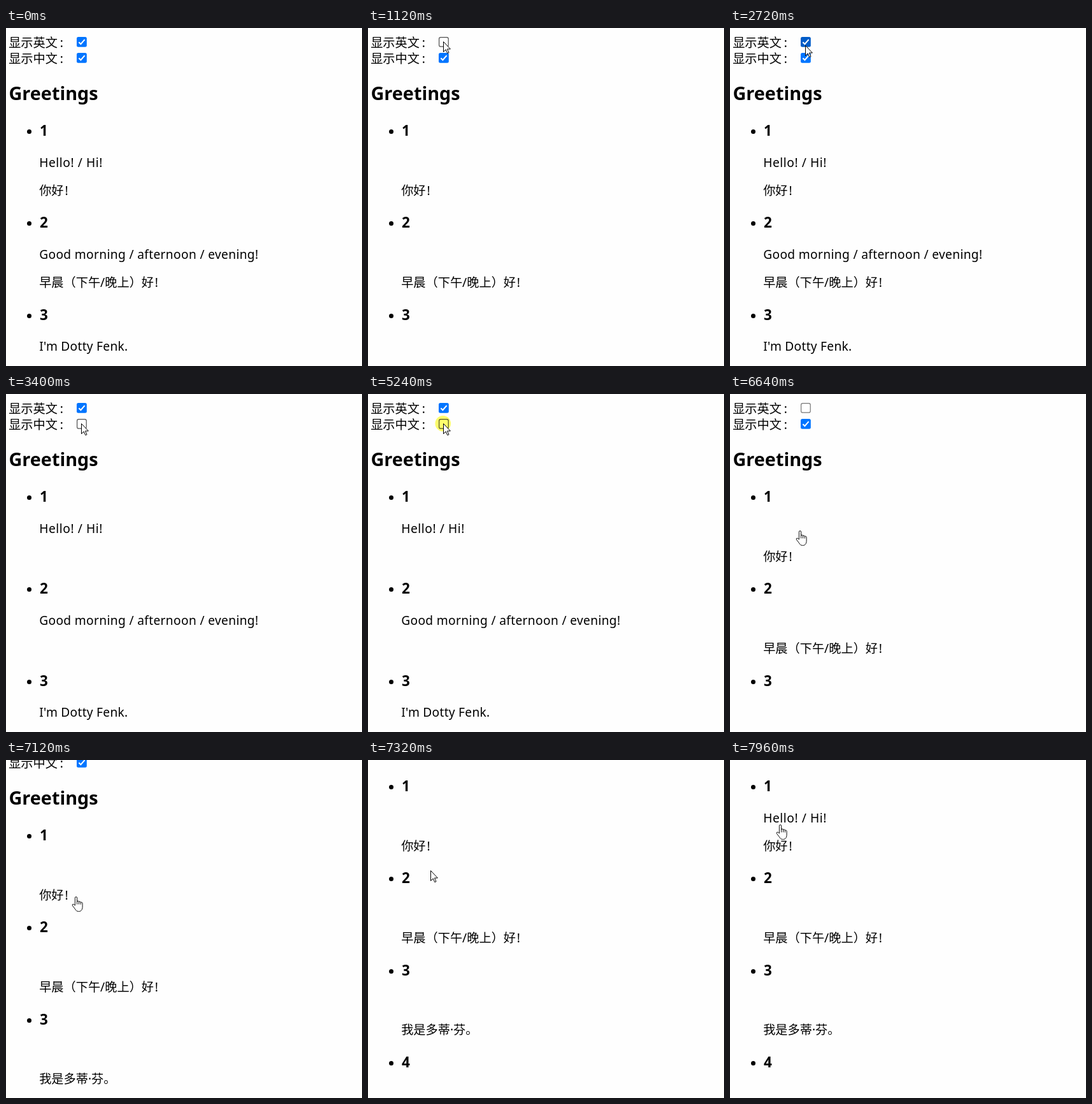
Animation of 559x530 px, one loop 8000 ms. Source, as an HTML page:

```html
<!DOCTYPE html>
<html lang="zh">
<head>
<meta charset="utf-8">
<title>Greetings</title>
<style>
html, body { margin: 0; width: 100%; height: 100%; overflow: hidden; background: #fefefe; }
svg { display: block; width: 559px; height: 530px; }
text { font: 19.2px "Noto Sans", "Noto Sans CJK SC", "Noto Sans CJK", sans-serif; fill: #000; }
.cn { font-weight: 350; }
.h2 { font-size: 28.8px; font-weight: 700; }
.h3 { font-size: 22.46px; font-weight: 700; }
</style>
</head>
<body>
<svg viewBox="0 0 559 530">
  <g id="page"></g>
  <circle id="glow" r="12.3" fill="#ffff6c" style="mix-blend-mode:multiply"/>
  <g id="pointer" stroke="#000" fill="#fff" stroke-linejoin="round">
    <path id="arrow" d="M.5.5V16.4L4.2 12.9L6.8 18.6L9 17.6L6.5 12H11.4Z"/>
    <g id="hand" transform="translate(-5.4 0)" stroke-width=".95">
      <path d="M4.8 14V2.2A1.6 1.6 0 0 1 8 2.2V8.6Q8 7 9.4 7T10.9 8.8Q11 7.6 12.3 7.8T13.7 9.8Q13.8 8.8 15.1 9T16.5 11V16C16.5 20.5 14.5 23.4 11 23.4H10C7.5 23.4 6 21.8 5 19.8L1.1 14.8Q0 12.7 1.2 12.2Q2.8 11.6 4.8 14Z"/>
      <path fill="none" d="M8 8.6V12.4M10.9 8.8V12.4M13.7 9.8V12.6"/>
    </g>
  </g>
</svg>
<script>
const LOOP = 8000, TICK = 40, PITCH = 144.3;
const $ = id => document.getElementById(id);
const page = $("page");
const within = (v, a, b) => v >= a && v < b;
const easeOut = (k, power = 2) => 1 - (1 - k) ** power;
const progress = (t, a, b) => Math.min(1, Math.max(0, (t - a) / (b - a)));
const show = (el, on) => { el.style.display = on ? "" : "none"; };

function set(el, attrs) {
  for (const k in attrs) el.setAttribute(k, attrs[k]);
  return el;
}

function add(tag, attrs, parent = page) {
  const el = document.createElementNS("http://www.w3.org/2000/svg", tag);
  return parent.appendChild(set(el, attrs));
}

// A closing mark can follow the string, set a little apart.
function write(x, y, str, attrs = {}, mark = "", gap = 0) {
  const el = add("text", { x, y, ...attrs });
  add("tspan", {}, el).textContent = str;
  if (mark) add("tspan", { dx: gap }, el).textContent = mark;
  return el;
}

function makeBox(y) {
  const rect = add("rect", { rx: 2.5, "stroke-width": 1.2 });
  const tick = add("path", {
    d: `M114.4 ${y + 8.2}L117.4 ${y + 11.2}L123.6 ${y + 4.2}`,
    fill: "none", stroke: "#fff", "stroke-width": 2
  });
  return (on, hover) => {
    const inset = on ? 0 : 0.6, size = 15.8 - 2 * inset;
    set(rect, {
      x: 111 + inset, y: y + inset, width: size, height: size,
      fill: on ? (hover ? "#005cc8" : "#0075ff") : "#fff",
      stroke: on ? "none" : (hover ? "#4f4f4f" : "#767676")
    });
    show(tick, on);
  };
}

const boxes = ["英", "中"].map((name, i) => {
  const y = 14 + 25 * i;
  write(4.2, y + 16, `显示${name}文`, { class: "cn" }, ":", 3.8);
  return { y, paint: makeBox(y) };
});
write(4.5, 113, "Greetings", { class: "h2" });

for (let i = 0; i < 4; i++) {
  const y = Math.round(169 + PITCH * i);
  add("circle", { cx: 36.5, cy: y - 6.5, r: 3.5 });
  write(53, y, String(i + 1), { class: "h3" });
}

const english = [
  ["Hello! / Hi!", 0.56],
  ["Good morning / afternoon / evening!", 0.33],
  ["I'm Dotty Fenk.", 0.25]
].map(([str, ls], i) => write(52.2, 218 + 144 * i, str, { "letter-spacing": ls }));

const chinese = [["你好", "!"], ["早晨（下午/晚上）好", "!"], ["我是多蒂·芬。"]]
  .map(([str, mark], i) => write(52.2, 262 + 144 * i, str, { class: "cn" }, mark, 1.8));

// Each move ends where the next one begins; bend bows it sideways.
const from = { x: 252, y: 153 };
const moves = [
  { a: 320, b: 840, x: 118, y: 21 },
  { a: 2680, b: 3000, x: 118, y: 46 },
  { a: 5480, b: 5680, x: 120, y: 17 },
  { a: 6040, b: 6640, x: 109, y: 214, bend: 16 },
  { a: 7240, b: 7640, x: 78, y: 101 }
];

const clicks = [
  { down: 1000, up: 1120, on: "en" },
  { down: 2320, up: 2400, on: "en" },
  { down: 3240, up: 3400, on: "cn" },
  { down: 5240, up: 5320, on: "cn" },
  { down: 5800, up: 5920, on: "en" },
  { down: 7840, up: 7960, on: "first" }
];

function tip(t) {
  let { x, y } = from;
  for (const m of moves) {
    const k = easeOut(progress(t, m.a, m.b));
    x += (m.x - x) * k + (m.bend || 0) * Math.sin(Math.PI * k);
    y += (m.y - y) * k;
    if (k < 1) break;
  }
  return [Math.round(x), Math.round(y)];
}

const scrollAt = t => Math.round(120 * easeOut(progress(t, 7080, 7240), 1.54));
const toggled = (t, name) => clicks.filter(c => c.on === name && t >= c.up).length % 2 === 1;

// Paragraphs are clickable, so the pointer becomes a hand over them.
function overText(x, y) {
  const r = (y - 198.5) % PITCH;
  return x >= 53 && (within(r, 0, 25) || within(r, 44.2, 69.2));
}

function draw(time) {
  const t = Math.floor((time % LOOP) / TICK) * TICK;
  const [x, y] = tip(t), top = scrollAt(t);
  const en = !toggled(t, "en"), cn = !toggled(t, "cn");
  const visible = t >= moves[0].a;
  const hand = overText(x, y + top);

  set(page, { transform: `translate(0 ${-top})` });
  english.forEach((el, i) => show(el, en || (i === 0 && toggled(t, "first"))));
  chinese.forEach(el => show(el, cn));
  boxes.forEach((box, i) => {
    const hover = visible && within(x, 111, 127) && within(y + top, box.y, box.y + 16);
    box.paint(i ? cn : en, hover);
  });

  show($("pointer"), visible);
  show($("arrow"), !hand);
  show($("hand"), hand);
  set($("pointer"), { transform: `translate(${x} ${y})` });
  set($("glow"), { cx: x - 0.3, cy: y + 0.3 });
  show($("glow"), clicks.some(c => within(t, c.down, c.up)));
}

const start = performance.now();
function frame() {
  draw(performance.now() - start);
  requestAnimationFrame(frame);
}
frame();
</script>
</body>
</html>
```
